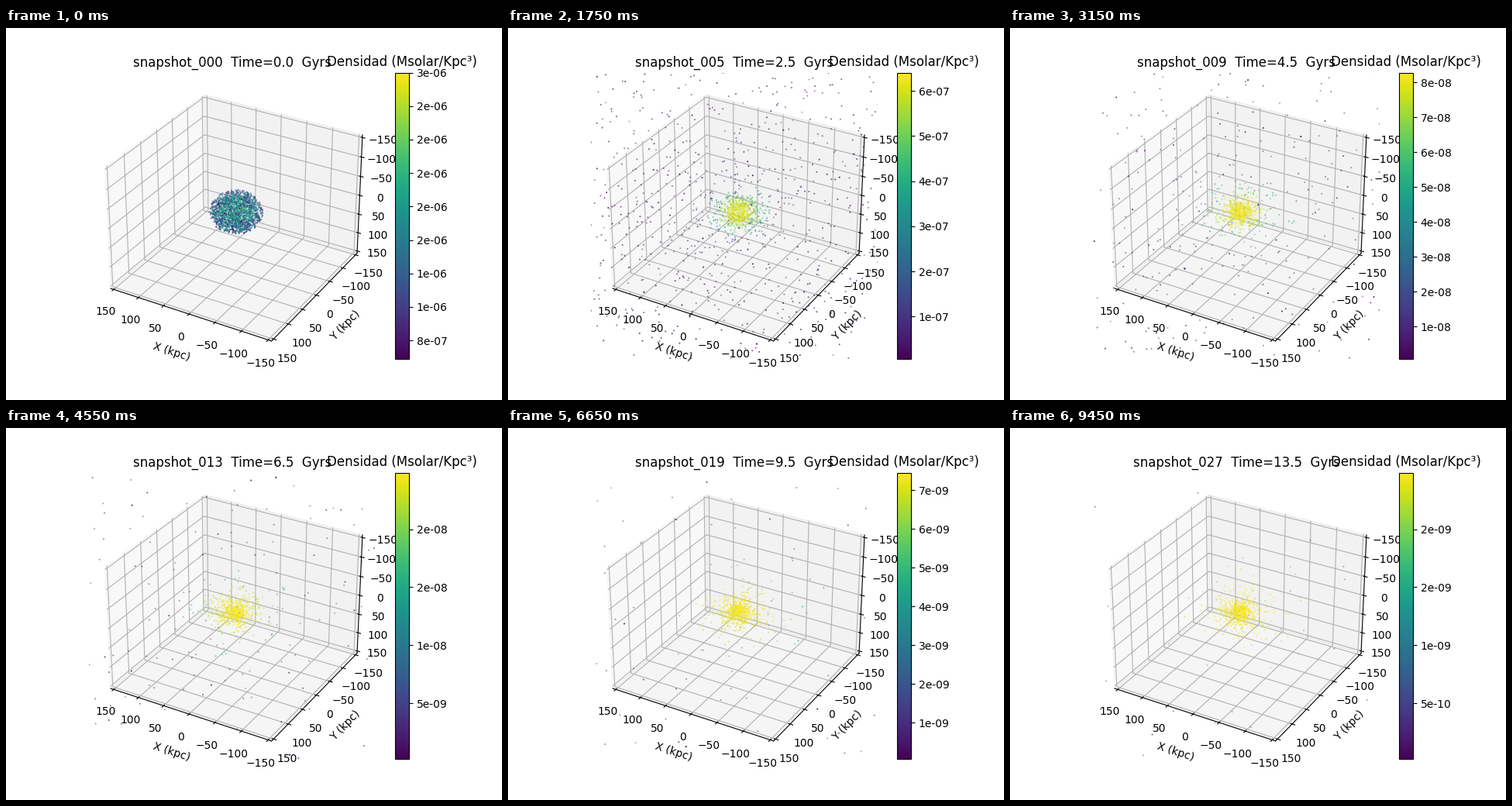
Write a matplotlib script that moves like this. It is 640 px wide and 480 px high and loops after 9.8 s.

```python
import numpy as np
import matplotlib.pyplot as plt
from matplotlib.animation import FuncAnimation
from matplotlib.cm import ScalarMappable
from matplotlib.colors import Normalize

FRAMES, STEP_MS = 28, 350
R0 = 46            # radius of the initial sphere, kpc
BOUND, FREE = 700, 1300
CORE = 19          # scale length of the bound cluster, kpc

rng = np.random.default_rng(12)


def unit(n):
    v = rng.normal(size=(n, 3))
    return v / np.linalg.norm(v, axis=1, keepdims=True)


# Bound particles circle the centre, free ones fly straight out
e1 = unit(BOUND)
e2 = np.cross(e1, unit(BOUND))
e2 /= np.linalg.norm(e2, axis=1, keepdims=True)
bound_start = R0 * rng.random(BOUND) ** (1 / 3)
bound_end = CORE / np.sqrt(rng.uniform(0.001, 0.98, BOUND) ** (-2 / 3) - 1)
spin = 22 / (bound_end + CORE)

free_start = unit(FREE) * R0 * rng.random((FREE, 1)) ** (1 / 3)
free_speed = rng.normal(0, 52, (FREE, 3))
noise = rng.normal(size=BOUND + FREE)


def positions(n):
    r = bound_end + (bound_start - bound_end) * np.exp(-n / 3)
    a = spin * n
    bound = r[:, None] * (e1 * np.cos(a)[:, None] + e2 * np.sin(a)[:, None])
    return np.vstack([bound, free_start + free_speed * n])


def limits(n):
    """Density range of the colour bar."""
    knots = np.array([0, 5, 9, 13, 19, 23, 27])
    peaks = [2.75e-6, 6.405e-7, 8.28e-8, 2.487e-8, 7.45e-9, 4.093e-9, 2.487e-9]
    top = np.exp(np.interp(np.log(n + 2), np.log(knots + 2), np.log(peaks)))
    return top * (0.008 + 0.214 * np.exp(-n)), top


def level(r, n):
    """Relative density at radius r, 0 to 1."""
    early = 0.62 - 0.35 * (r / R0) ** 2 + 0.12 * noise
    late = (1 + 0.03 * noise) / (1 + (r / np.hypot(30, 12 * n ** 0.85)) ** 3)
    w = np.exp(-n / 1.5)
    return np.clip(w * np.clip(early, 0, 1) + (1 - w) * late, 0, 1)


fig = plt.figure(figsize=(6.4, 4.8), dpi=100)
ax = fig.add_subplot(projection="3d")
edge = 150 * 25 / 24
ticks = np.arange(-150, 151, 50)
ax.set(xlim=(edge, -edge), ylim=(edge, -edge), zlim=(edge, -edge),
       xticks=ticks, yticks=ticks, zticks=ticks,
       xlabel="X (kpc)", ylabel="Y (kpc)")

norm = Normalize(*limits(0))
bar = fig.colorbar(ScalarMappable(norm, "viridis"), ax=ax, format="%.0e")
bar.ax.set_title("Densidad (Msolar/Kpc³)")
dots = None


def draw(n):
    global dots
    if dots is not None:
        dots.remove()
    lo, hi = limits(n)
    norm.autoscale(np.array([lo, hi]))
    p = positions(n)
    r = np.linalg.norm(p, axis=1)
    density = lo + (hi - lo) * level(r, n)
    near = r < 1200
    dots = ax.scatter(*p[near].T, c=density[near], norm=norm, cmap="viridis",
                      s=2.3, linewidths=0)
    ax.set_title(f"snapshot_{n:03d}  Time={n / 2:.1f}  Gyrs")
    return []


anim = FuncAnimation(fig, draw, frames=FRAMES, interval=STEP_MS,
                     init_func=lambda: [], repeat=True)
plt.show()
```
